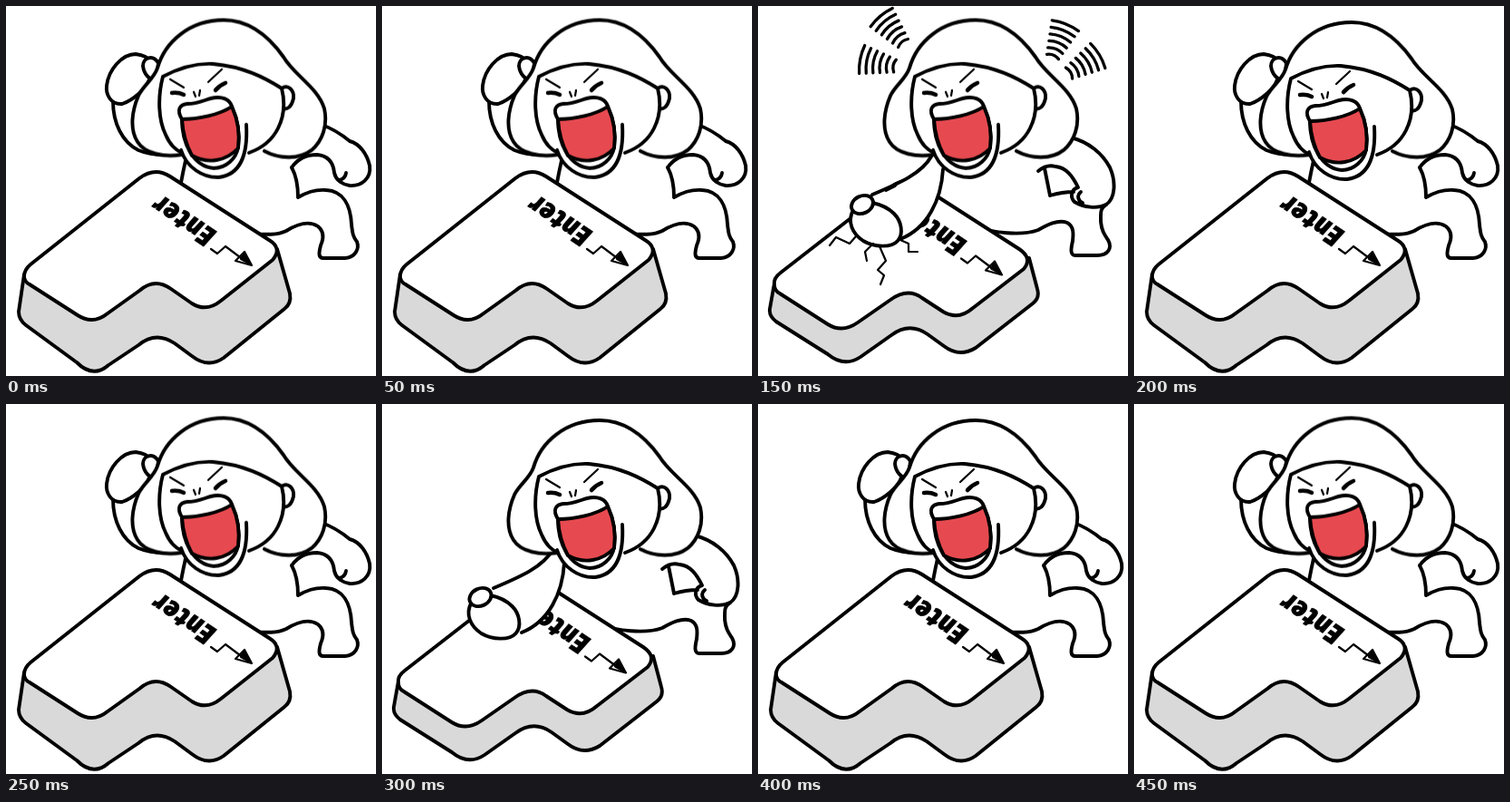
Animation, 408 px wide and 408 px high, one loop 500 ms. Source, as an HTML page:

```html
<!DOCTYPE html>
<html lang="en">
<head>
<meta charset="utf-8">
<title>Enter smash</title>
<style>
html, body { margin: 0; width: 100%; height: 100%; overflow: hidden; background: #fff; }
svg { display: block; width: 100vw; height: 100vh; }
.ink { fill: #fff; stroke: #000; stroke-width: 3.9; stroke-linecap: round; stroke-linejoin: round; }
.line { fill: none; }
.thin { fill: none; stroke-width: 2.2; }
.side { fill: #d9d9d9; }
.label { font: italic 800 30px "Open Sans", "Noto Sans", sans-serif; fill: #000; stroke: #000; stroke-width: .5; }
</style>
</head>
<body>
<svg viewBox="0 0 408 408">
  <defs>
    <g id="legend">
      <text class="label" transform="matrix(-.79 -.53 .52 -.88 233 249)">Enter</text>
      <path class="thin" d="M226 268L233 273L242 265L262 280"/>
      <path class="thin" d="M263 271L253 281L271 286Z"/>
      <path d="M262 273L259 279L270 285Z" fill="#000" stroke-width="2"/>
    </g>
    <g id="hit">
      <path d="M191 165C181 184 157 195 124 208L150 250L157 257C182 244 203 216 204 180Z" stroke="none"/>
      <path class="line" d="M191 166C181 184 157 195 126 208M204 180C202 214 187 245 157 257"/>
    </g>
    <g id="fist">
      <path d="M105 225C98 238 104 251 116 259C128 266 147 267 154 259C161 251 158 237 150 229C143 222 136 219 126 217Z"/>
      <ellipse cx="115" cy="219" rx="12.5" ry="9.5" transform="rotate(-25 115 219)"/>
    </g>
  </defs>

  <g class="ink" data-on="1100110011">
    <path class="line" d="M198 170C196 182 193 188 192 205M270 251C286 252 299 253 309 248C322 240 335 237 344 243C350 248 351 255 347 264C345 272 344 278 350 278L374 278C385 277 390 268 387 260C382 254 382 249 381 241C380 220 372 204 353 203C340 202 331 206 322 211C322 198 320 187 315 178"/>
    <path class="line" d="M315 178C322 168 333 164 343 164C356 165 361 174 362 184C364 193 372 197 379 198C392 199 403 190 401 176C398 163 390 152 379 149C368 140 360 135 348 131M367 192Q374 191 375 184"/>
    <path class="side" d="M20 296L14 337Q14 346 22 352L78 393Q96 411 113 396L146 374Q165 358 186 372L205 386Q223 400 240 388L307 334Q315 328 313 317L299 268Z"/>
    <path d="M20 298Q20 291 27 285L147 190Q164 177 181 188L290 258Q305 267 294 280L237 325Q221 338 205 328L182 312Q164 299 147 314L112 339Q96 352 79 341L26 307Q20 304 20 298Z"/>
    <use href="#legend"/>
    <path class="line" d="M118 105C118 129 128 150 146 159C158 164 176 165 192 163"/>
    <path d="M158 81C155 91 140 104 128 108C115 109 110 97 111 88C113 70 128 53 143 53C150 54 156 56 158 60Z"/>
    <path d="M168 63C162 53 151 57 151 66C152 75 158 82 166 82Z"/>
  </g>

  <g class="ink" data-on="0011001100">
    <path class="line" d="M345 145C365 150 380 163 388 178C395 194 394 212 384 219C377 223 378 228 378 238C379 248 382 252 386 258C391 267 386 275 374 275L350 275C344 275 345 268 347 259C348 250 348 243 341 239C330 235 318 242 309 247C290 254 260 250 238 243"/>
    <path class="line" d="M309 182C315 177 321 175 328 177C340 178 347 188 353 200M316 179L322 209C332 206 340 205 348 205M353 200C345 202 344 211 349 216C359 222 374 224 384 219M356 205C351 209 353 215 358 217"/>
    <path class="side" d="M18 306L13 334Q12 342 20 348L77 384Q95 399 113 387L147 363Q167 348 187 362L205 375Q222 388 240 377L303 328Q311 322 308 312L299 278Z"/>
    <path d="M18 307Q17 300 25 294L146 200Q162 187 179 198L288 268Q303 278 293 290L237 333Q221 347 204 337L181 322Q165 310 146 324L110 349Q93 361 77 351L24 317Q18 314 18 307Z"/>
    <use href="#legend" x="-2" y="10.5"/>
  </g>

  <g class="ink" data-on="0011000000">
    <use href="#hit"/>
    <path class="line" d="M141 203L151 198"/>
    <use href="#fist"/>
  </g>
  <g class="ink" data-on="0000001100">
    <use href="#hit" x="-3" y="-5"/>
    <use href="#fist" x="-6.5" y="-6"/>
  </g>
  <path class="ink thin" data-on="0001000000" d="M108 254L101 262L86 255L79 264M127 262L118 271L120 281M134 265L141 281L132 291L139 297L135 307M157 258L166 262L166 271L176 271"/>

  <g class="ink">
    <g data-lift="scale">
      <path d="M193 164C175 167 153 163 145 150C136 136 139 116 146 100C152 88 163 82 167 70C175 42 202 18 240 18C272 18 293 40 306 58C318 78 344 91 351 114C355 132 349 149 337 159C323 170 300 168 285 160L235 170Z" stroke="none"/>
      <path class="line" d="M193 164C175 167 153 163 145 150C136 136 139 116 146 100C152 88 163 82 167 70C175 42 202 18 240 18C272 18 293 40 306 58C318 78 344 91 351 114C355 132 349 149 337 159C323 170 300 168 285 160"/>
    </g>
    <g data-lift="move">
      <path d="M304 93C311 88 318 95 317 104C315 113 310 118 304 114Z"/>
      <path d="M173 80C167 103 168 128 176 144C181 156 187 160 193 164C201 181 217 192 235 191C251 189 260 176 264 164C282 159 296 149 301 132C307 117 307 104 304 94Z" stroke="none"/>
      <path class="line" d="M268 164C282 159 293 151 300 137C306 125 308 109 304 93C285 81 262 69 228 66C208 65 190 71 173 80C167 103 168 128 176 144C181 156 187 160 193 164"/>
      <path class="line" d="M193 161C199 180 217 192 235 191C258 188 267 168 265 133"/>
      <path d="M194 127C194 153 206 179 229 181C243 181 254 170 256 158C258 143 255 126 249 113Z"/>
      <path d="M194 127C195 143 199 156 205 167C223 177 243 173 256 159C258 143 255 126 249 113Z" fill="#e64a50"/>
      <path d="M194 127C188 117 191 111 200 110C212 110 218 106 226 104C238 101 247 105 249 113C236 122 212 127 194 127Z"/>
      <path class="thin" d="M181 83L196 92M238 72L223 86M207 97L209 102M214 95L213 101"/>
      <path class="line" stroke-width="4.5" d="M183 98Q190 97 196 100M231 95Q235 90 242 87"/>
    </g>
  </g>

  <g class="ink line" id="waves" data-on="0001000100"></g>
</svg>
<script>
const STEP = 50, STEPS = 10;

// [x, y, angle] of the inner end of each shout mark
const marks = [[160, 41, 230], [151, 66, 191], [325, 56, -68], [343, 74, -31]];
const bars = Array.from({ length: 6 }, (_, i) => {
  const x = i * 7.4, h = 7 + i * 1.75;
  return `M${x} ${-h}Q${x + 4} 0 ${x} ${h}`;
}).join('');
document.getElementById('waves').innerHTML = marks.map(([x, y, a]) =>
  `<path class="line" stroke-width="3.3" d="${bars}" transform="translate(${x} ${y}) rotate(${a})"/>`
).join('');

// Plays one held value per step, forever, from page load
function hold(el, prop, values) {
  const frames = [...values, values[0]].map((v, i) =>
    ({ [prop]: v, offset: i / STEPS, easing: 'steps(1, end)' }));
  el.animate(frames, { duration: STEP * STEPS, iterations: Infinity }).startTime = 0;
}

document.querySelectorAll('[data-on]').forEach(el =>
  hold(el, 'opacity', [...el.dataset.on].map(Number)));

const lifts = {
  move: ['translate(0px, 0px)', 'translate(0px, -2.2px)'],
  scale: ['translate(0px, 0px) scale(1, 1)', 'translate(0px, -2.8px) scale(1, 1.017)']
};
document.querySelectorAll('[data-lift]').forEach(el =>
  hold(el, 'transform', Array.from({ length: STEPS }, (_, i) => lifts[el.dataset.lift][i % 2])));
</script>
</body>
</html>
```
